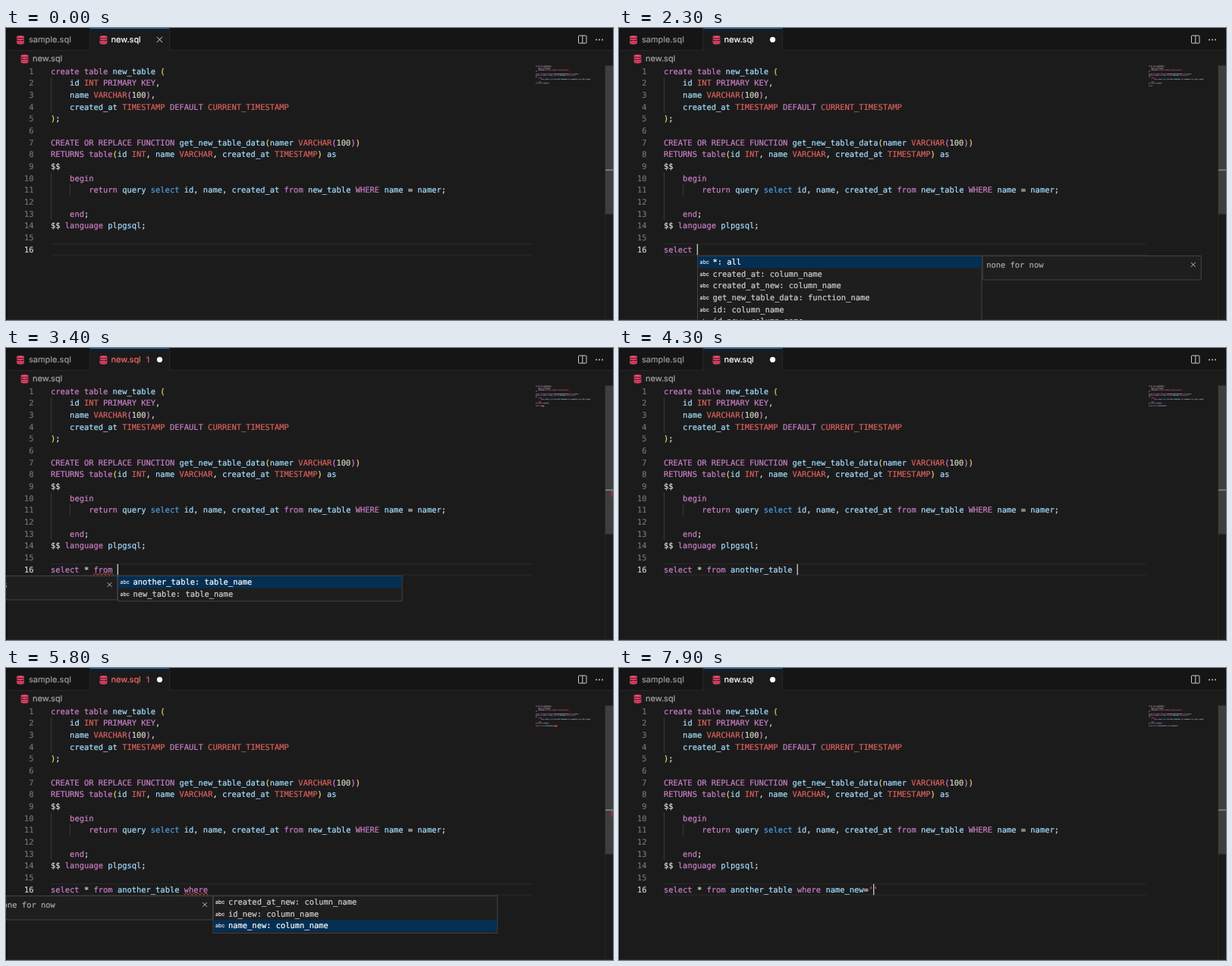
An HTML page for the animation above (8 s loop, 800 px wide and 385 px high).

```html
<!DOCTYPE html>
<html lang="en">
<head>
<meta charset="utf-8">
<title>SQL completion</title>
<style>
  html, body { margin: 0; width: 100%; height: 100%; overflow: hidden; background: #1c1b1c; }
  svg { display: block; width: 800px; height: 385px; }
  text { white-space: pre; text-rendering: geometricPrecision; stroke-width: 0.2; }
  text, tspan { fill: currentColor; stroke: currentColor; }
  .code { font: 10.43px "DejaVu Sans Mono", monospace; }
  .ui { font: 11px Inter, sans-serif; }
  .abc { font: 7px Inter, sans-serif; }
</style>
</head>
<body>
<svg viewBox="0 0 800 385">
  <g id="base"></g>
  <g id="live"></g>
</svg>
<script>
const LOOP = 8000, CW = 6.279, LH = 15.66, X0 = 59, Y0 = 60.6;
const MAP = { x: 698, y: 49.6, cw: 0.87, lh: 1.74 };
const C = {
  keyword: '#c97fc4', type: '#d9605c', name: '#a2defe', plain: '#dcdcdc', blue: '#4a9fe0',
  number: '#d5d9c0', gold: '#f5d860', pink: '#da80d6', string: '#d0694f', error: '#f04c4c',
  errorTab: '#f4685f', icon: '#f0436f'
};
const KEYWORDS = /^(create|table|or|replace|function|returns|primary|key|default|begin|return|select|from|where|end|language)$/i;
const TYPES = /^(INT|VARCHAR|TIMESTAMP|CURRENT_TIMESTAMP)$/;

const SOURCE = `create table new_table (
    id INT PRIMARY KEY,
    name VARCHAR(100),
    created_at TIMESTAMP DEFAULT CURRENT_TIMESTAMP
);

CREATE OR REPLACE FUNCTION get_new_table_data(namer VARCHAR(100))
RETURNS table(id INT, name VARCHAR, created_at TIMESTAMP) as
$$
    begin
        return query select id, name, created_at from new_table WHERE name = namer;

    end;
$$ language plpgsql;
`.split('\n');

const COLUMNS = ['created_at_new: column_name', 'id_new: column_name', 'name_new: column_name'];
const ALL = ['*: all', 'created_at: column_name', 'created_at_new: column_name',
  'get_new_table_data: function_name', 'id: column_name', 'id_new: column_name'];
const TABLES = ['another_table: table_name', 'new_table: table_name'];
const NONE = 'none for now';
const FROM = 'select * from', WHERE = FROM + ' another_table where';
const badFrom = { bad: [9, 4], mark: true, count: true };
const badWhere = { bad: [28, 5], mark: true, count: true };
const columns = { ...badWhere, list: COLUMNS, doc: NONE };

// [start ms, text of the last line, extras]
const STEPS = [
  [0, '', { clean: true }],
  [900, 's', {}],
  [1000, 's', { bad: [0, 1], mark: true, list: ['select'], match: 1 }],
  [1600, 'select', {}],
  [1900, 'select ', {}],
  [2000, 'select ', { list: ALL, doc: NONE, right: true }],
  [2500, 'select *', {}],
  [2700, 'select * ', {}],
  [2800, 'select * f', { list: ['from'], match: 1 }],
  [3000, FROM, {}],
  [3100, FROM + ' ', {}],
  [3300, FROM + ' ', { ...badFrom, list: TABLES, doc: 'list of the known rows' }],
  [3900, FROM + ' another_table', badFrom],
  [4100, FROM + ' another_table', {}],
  [4200, FROM + ' another_table ', {}],
  [4400, FROM + ' another_table w', { list: ['where'], match: 1 }],
  [4700, WHERE, {}],
  [4800, WHERE, badWhere],
  [4900, WHERE + ' ', badWhere],
  [5000, WHERE + ' ', columns],
  [5500, WHERE + ' ', { ...columns, pick: 1 }],
  [5700, WHERE + ' ', { ...columns, pick: 2 }],
  [6000, WHERE + ' name_new', badWhere],
  [6200, WHERE + ' name_new', {}],
  [6300, WHERE + ' name_new ', {}],
  [6900, WHERE + ' name_new', {}],
  [7200, WHERE + ' name_new=', {}],
  [7500, WHERE + " name_new=''", { back: 1 }]
];

const rect = (x, y, w, h, fill, more = '') =>
  `<rect x="${x}" y="${y}" width="${w}" height="${h}" fill="${fill}" ${more}/>`;
const text = (x, y, cls, color, s, more = '') =>
  `<text x="${x}" y="${y}" class="${cls}" color="${color}" ${more}>${s}</text>`;
const path = (d, stroke, w = 1) => `<path d="${d}" fill="none" stroke="${stroke}" stroke-width="${w}"/>`;
const cross = (x, y, r, color) =>
  path(`M${x - r} ${y - r}l${2 * r} ${2 * r}M${x + r} ${y - r}l${-2 * r} ${2 * r}`, color);
const lineY = n => Y0 + n * LH;
const colX = n => X0 + n * CW;

let depth = 0;
function tokens(line) {
  let col = 0, prev = '';
  return (line.match(/\s+|\w+|\$\$|'|./g) || []).map(s => {
    let color = C.plain;
    if (s === '(') color = depth++ % 2 ? C.pink : C.gold;
    else if (s === ')') color = --depth % 2 ? C.pink : C.gold;
    else if (s === "'") color = C.string;
    else if (s === 'select' && prev === 'query') color = C.blue;
    else if (KEYWORDS.test(s)) color = C.keyword;
    else if (TYPES.test(s)) color = C.type;
    else if (/^\d+$/.test(s)) color = C.number;
    else if (/^\w/.test(s)) color = C.name;
    const token = { s, color, col };
    col += s.length;
    if (s.trim()) prev = s;
    return token;
  });
}

function codeLine(line, n, bad) {
  const list = tokens(line);
  const spans = list.map(t => `<tspan color="${t.color}">${t.s}</tspan>`).join('');
  const mini = list.filter(t => t.s.trim()).map(t => {
    const wrong = bad && t.col === bad[0];
    return rect(MAP.x + t.col * MAP.cw, MAP.y + n * MAP.lh, t.s.length * MAP.cw, wrong ? 1.6 : 1.1,
      wrong ? C.error : t.color, `opacity="${wrong ? 1 : 0.5}"`);
  }).join('');
  return text(X0, lineY(n), 'code', C.plain, spans) + mini;
}

function dbIcon(x, y) {
  const band = dy => `<path d="M${x - 5} ${y + dy}v1.8c0 2.4 10 2.4 10 0v-1.8c0 2-10 2-10 0z" fill="${C.icon}"/>`;
  return `<ellipse cx="${x}" cy="${y - 3.3}" rx="5" ry="1.7" fill="${C.icon}"/>` + band(-2.2) + band(0.7) + band(2.9);
}

function drawBase() {
  let s = rect(0, 0, 800, 385, '#1c1b1c') + rect(0, 0, 800, 30, '#161516')
    + rect(0, 29, 800, 1, '#272627') + rect(111, 0, 104, 30, '#1c1b1c')
    + rect(110, 0, 1, 30, '#272627') + rect(215, 0, 1, 30, '#272627')
    + rect(111, 0, 104, 1, '#0a74c9') + rect(0, 0, 1.5, 385, '#111') + rect(0, 384, 800, 1, '#2a292a');
  s += dbIcon(19, 15) + dbIcon(128.5, 15) + dbIcon(24.5, 40)
    + text(30, 19, 'ui', '#9a9a9a', 'sample.sql') + text(35, 44.2, 'ui', '#a4a4a4', 'new.sql');
  s += '<rect x="754.5" y="10" width="10.5" height="10" rx="1" fill="none" stroke="#ccc"/>' + path('M759.8 10v10', '#ccc');
  for (const x of [778, 782, 786]) s += `<circle cx="${x}" cy="15.5" r="1" fill="#ccc"/>`;
  s += path(`M${X0} 284.8H695M${X0} 299.2H695`, '#2b2a2b');
  s += path('M59.5 65v47M59.5 190v63', '#3a393a') + path('M84.5 206v15', '#3a393a');
  for (let n = 0; n < 16; n++)
    s += text(36.5, lineY(n), 'code', n === 15 ? '#d0d0d0' : '#6e7278', n + 1, 'text-anchor="end"');
  SOURCE.forEach((line, n) => s += codeLine(line, n));
  s += rect(789, 49, 1, 336, '#262526') + rect(790, 49.5, 10, 196, '#3f3e3f') + rect(790, 186.5, 10, 1.6, '#858585');
  document.getElementById('base').innerHTML = s;
}

function popup(x, o) {
  const w = 375.7, top = 300, pick = o.pick || 0;
  let s = rect(x + 0.5, top + 0.5, w - 1, o.list.length * LH + 2, '#1f1e1f', 'stroke="#454445"');
  o.list.forEach((item, i) => {
    const y = top + 0.8 + i * LH, on = i === pick;
    if (on) s += rect(x + 1, y, w - 2, LH, '#042f52');
    const label = o.match
      ? `<tspan color="#2aa5ff" font-weight="bold">${item.slice(0, o.match)}</tspan>${item.slice(o.match)}` : item;
    s += text(x + 3.6, y + 10.3, 'abc', '#e4e4e4', 'abc')
      + text(x + 20.5, y + 11.2, 'code', on ? '#fff' : '#d0d0d0', label);
  });
  if (o.doc) {
    const end = o.right ? x + w + 288.5 : x;
    s += rect(end - 288, top + 0.5, 288, 31.5, '#1f1e1f', 'stroke="#454445"')
      + text(end - 283, top + 15.6, 'code', '#a8a8a8', o.doc) + cross(end - 10.4, 312, 2.9, '#b8b8b8');
  }
  return s;
}

function squiggle([col, len]) {
  const half = 2.6;
  let d = `M${colX(col)} 299`;
  for (let i = 0; (i + 0.5) * half < len * CW; i++) d += `l${half} ${i % 2 ? 2.3 : -2.3}`;
  return path(d, C.error, 0.9);
}

function drawLive([, line, o], caretOn) {
  const caret = colX(line.length - (o.back || 0));
  let s = text(138.5, 19, 'ui', o.count ? C.errorTab : '#fff', 'new.sql');
  if (o.count) s += text(185, 19, 'ui', C.errorTab, '1', 'style="font-size:10px"');
  s += o.clean ? cross(202.5, 15.3, 3.6, '#e0e0e0') : '<circle cx="202.5" cy="15.3" r="3.6" fill="#fff"/>';
  s += codeLine(line, 15, o.bad);
  if (o.bad) s += squiggle(o.bad);
  if (o.mark) s += rect(797, 188, 3, 8, '#8a3438');
  if (caretOn) s += rect(caret - 0.3, 284.8, 1.4, 14.5, '#c0c0bd');
  if (o.list) s += popup(caret, o);
  document.getElementById('live').innerHTML = s;
}

let shown = '';
function render(ms) {
  const t = ms % LOOP;
  let i = STEPS.length - 1;
  while (STEPS[i][0] > t) i--;
  let k = i;
  while (k > 0 && STEPS[k - 1][1] === STEPS[i][1]) k--;
  // the caret stays solid after a key, then blinks
  const caretOn = (k ? t - STEPS[k][0] : t + 500) % 1000 < 500;
  const key = i + '|' + caretOn;
  if (key !== shown) drawLive(STEPS[i], caretOn);
  shown = key;
}

drawBase();
render(0);
const start = performance.now();
(function tick() {
  render(performance.now() - start);
  requestAnimationFrame(tick);
})();
</script>
</body>
</html>
```
